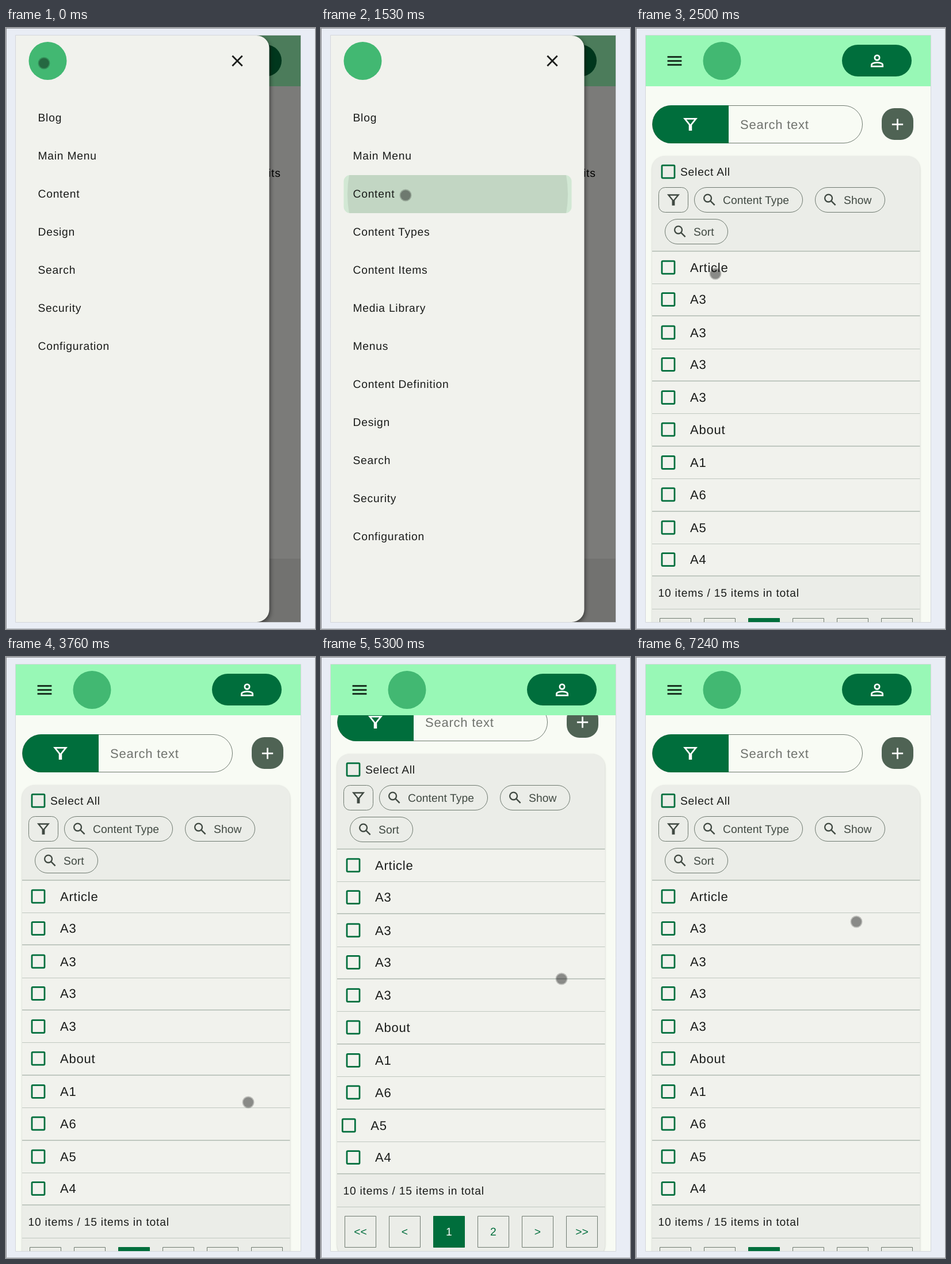
Write an HTML page with a canvas that moves like this. It is 537x1042 px and loops after 8000 ms.

```html
<!DOCTYPE html>
<html lang="en">
<head>
<meta charset="utf-8">
<title>Mobile admin menu</title>
<style>
html, body { margin: 0; width: 100%; height: 100%; overflow: hidden; background: #e9edf5; }
canvas { display: block; }
</style>
</head>
<body>
<canvas id="stage" width="537" height="1042"></canvas>
<script>
const ctx = document.getElementById('stage').getContext('2d');
const LOOP = 8000, TICK = 140;
const GREEN = '#006e3c', INK = '#1a1c1a', PANEL = '#f1f2ed', BAR = '#ebede8', OUTLINE = '#6f7a70', GREY = '#404942', LOGO = '#42b872';

// Line icons on a 24 unit grid
const ICONS = {
  menu: 'M3 7h18M3 12h18M3 17h18',
  person: 'M9 8a3 3 0 1 1 6 0a3 3 0 1 1-6 0M5 19v-2c0-2 4.5-3 7-3s7 1 7 3v2z',
  filter: 'M5 5h14l-6 7.5v6.5h-2v-6.5z',
  search: 'M4 9.5a5.5 5.5 0 1 1 11 0a5.5 5.5 0 1 1-11 0M13.6 13.6l6.2 6.2',
  plus: 'M5 12h14M12 5v14',
  close: 'M5.7 5.7l12.6 12.6M18.3 5.7l-12.6 12.6'
};

const MENU = ['Blog', 'Main Menu', 'Content', 'Design', 'Search', 'Security', 'Configuration'];
const SUBMENU = ['Content Types', 'Content Items', 'Media Library', 'Menus', 'Content Definition'];
const OPEN_MENU = [...MENU.slice(0, 3), ...SUBMENU, ...MENU.slice(3)];
const ITEMS = ['Article', 'A3', 'A3', 'A3', 'A3', 'About', 'A1', 'A6', 'A5', 'A4'];
const PAGES = ['<<', '<', '1', '2', '>', '>>'];

// Pointer stops: time, x, y
const STOPS = [[0, 66, 61], [1080, 147, 290], [1660, 147, 290], [2240, 138, 426], [3240, 138, 426],
  [3780, 421, 772], [4050, 445, 860], [4620, 421, 767], [5320, 418, 558], [5740, 404, 148],
  [6290, 404, 480], [7240, 383, 459]];

function pointerAt(t) {
  const next = STOPS.findIndex(stop => stop[0] > t);
  if (next < 0) return STOPS.at(-1).slice(1);
  const [t0, x0, y0] = STOPS[next - 1], [t1, x1, y1] = STOPS[next];
  const u = (t - t0) / (t1 - t0);
  return [x0 + (x1 - x0) * u, y0 + (y1 - y0) * u];
}

function ramp(t, from, to) {
  const u = Math.min(1, Math.max(0, (t - from) / (to - from)));
  return u * u * (3 - 2 * u);
}

const scrollAt = t => Math.round(61.6 * (ramp(t, 4340, 4620) - ramp(t, 5280, 5460)));
const swipeAt = t => -25 * (ramp(t, 5150, 5610) - ramp(t, 6580, 6850));

function rect(x, y, w, h, fill) {
  ctx.fillStyle = fill;
  ctx.fillRect(x, y, w, h);
}

function box(x, y, w, h, r, fill, stroke, width = 1) {
  ctx.beginPath();
  ctx.roundRect(x, y, w, h, r);
  if (fill) { ctx.fillStyle = fill; ctx.fill(); }
  if (stroke) { ctx.strokeStyle = stroke; ctx.lineWidth = width; ctx.stroke(); }
}

function disc(x, y, r, fill) {
  ctx.beginPath();
  ctx.arc(x, y, r, 0, 2 * Math.PI);
  ctx.fillStyle = fill;
  ctx.fill();
}

function icon(name, x, y, color, scale = 1.375) {
  ctx.save();
  ctx.translate(x, y);
  ctx.scale(scale, scale);
  ctx.translate(-12, -12);
  ctx.strokeStyle = color;
  ctx.lineWidth = 2;
  ctx.stroke(new Path2D(ICONS[name]));
  ctx.restore();
}

function text(str, x, cy, size = 19.25, fill = INK, spacing = .77, align = 'left') {
  ctx.font = `${size}px "Liberation Sans", Arial, sans-serif`;
  ctx.textRendering = 'geometricPrecision';
  ctx.letterSpacing = spacing + 'px';
  ctx.textAlign = align;
  ctx.fillStyle = fill;
  ctx.fillText(str, x, Math.round(cy + size * .36));
}

function shadow(color, blur, x, y) {
  ctx.shadowColor = color;
  ctx.shadowBlur = blur;
  ctx.shadowOffsetX = x;
  ctx.shadowOffsetY = y;
}

const checkbox = y => box(45, y - 11, 22, 22, 1.5, null, GREEN, 2.75);

function chip(label, x, y, w) {
  box(x, y, w, 43, 21.5, null, OUTLINE);
  icon('search', x + 26, y + 21.5, GREY, 1.17);
  text(label, x + 49.5, y + 21.5, 19.25, GREY, .08);
}

function drawDrawer(t) {
  rect(17, 13, 495, 1017, '#7b7b79');
  rect(17, 920, 495, 110, '#727270');
  rect(17, 13, 495, 88, '#4c7c5b');
  box(358, 29, 121, 55, 27.5, '#00371d');
  text('its', 456, 251, 19.25, '#000');

  ctx.save();
  shadow('rgba(0,0,0,.45)', 7, 2, 3);
  box(17, 13, 440.5, 1017, [0, 22, 22, 0], PANEL);
  ctx.restore();

  disc(72.5, 57, 33, LOGO);
  icon('close', 402, 57, INK);

  if (t >= 1230) {
    const row = t < 2370 ? 2 : 4;
    box(39.5, 123 + 66 * row, 396, 66, 11, '#d2e8d4');
    if (t < 1800) drawRipple(t);
  }
  const labels = t < 1500 ? MENU : OPEN_MENU;
  labels.forEach((label, i) => text(label, 55.5, 155.5 + 66 * i));
}

// Spreads from the pointer to the middle of the row, then fades
function drawRipple(t) {
  const grow = ramp(t, 1340, 1540), fade = ramp(t, 1540, 1820);
  ctx.save();
  ctx.clip();
  disc(147 + 90.5 * grow, 290 - 2 * grow, 191.5 * grow + 24 * fade, `rgba(0,0,0,${.08 * (1 - fade)})`);
  ctx.restore();
}

function drawList(t) {
  rect(17, 13, 495, 1017, '#f8fbf4');
  ctx.save();
  ctx.translate(0, -scrollAt(t));

  box(28.5, 134.5, 365, 65, 32.5, null, OUTLINE);
  box(28.5, 134, 132.5, 66, [33, 0, 0, 33], GREEN);
  icon('filter', 94.5, 167, '#fff');
  text('Search text', 181, 167, 22, '#70736e');
  box(427, 139, 55, 55, 22, '#4f6354');
  icon('plus', 454.5, 167, '#fff');

  ctx.save();
  shadow('rgba(0,0,0,.22)', 3, 0, 1);
  box(28, 222, 465.5, 873, 22, BAR);
  ctx.restore();
  checkbox(249);
  text('Select All', 77, 249);
  box(39.5, 276.5, 51, 43, 11, null, OUTLINE);
  icon('filter', 65, 298, GREY, 1.22);
  chip('Content Type', 101.5, 276.5, 188);
  chip('Show', 311.5, 276.5, 121);
  chip('Sort', 50.5, 331.5, 109);

  rect(28, 387, 465.5, 563, PANEL);
  for (let i = 0; i <= 11; i++) {
    const thick = i % 2 === 0;
    rect(28, Math.round(386.5 + 56.375 * i) - thick, 465.5, thick ? 2 : 1, '#c0c8c0');
  }
  ITEMS.forEach((label, i) => {
    // Rows come in pairs, as every second rule is thicker
    const y = 415 + 112.75 * (i >> 1) + 55.5 * (i % 2);
    ctx.save();
    if (label === 'A5') ctx.translate(swipeAt(t), 0);
    checkbox(y);
    text(label, 94, y, 22);
    ctx.restore();
  });

  text('10 items / 15 items in total', 38.5, 979);
  PAGES.forEach((label, i) => {
    const x = 41.5 + 77 * i, active = label === '1';
    box(x, 1023.5, 54, 54, 0, active ? GREEN : null, active ? GREEN : OUTLINE);
    text(label, x + 27, 1050, 19.25, active ? '#fff' : GREEN, .1, 'center');
  });
  ctx.restore();

  rect(17, 13, 495, 88, '#98f8b6');
  icon('menu', 67, 57, '#0d1f12');
  disc(149.5, 57, 33, LOGO);
  box(358, 29, 121, 55, 27.5, GREEN);
  icon('person', 419, 57, '#fff');
}

function draw(now) {
  const t = now % LOOP;
  const time = TICK * Math.floor((t + 40) / TICK);
  rect(0, 0, 537, 1042, '#e9edf5');
  rect(0, 0, 537, 1, '#8b8d91');
  rect(0, 0, 1, 1042, '#8b8d91');
  rect(0, 1041, 537, 1, '#b4b7bd');
  box(16.5, 12.5, 496, 1018, 0, null, '#d4d7dc');

  ctx.save();
  ctx.beginPath();
  ctx.rect(17, 13, 495, 1017);
  ctx.clip();
  if (t < 2500) drawDrawer(time);
  else drawList(time);
  const [x, y] = pointerAt(time);
  disc(x, y, 10.5, 'rgba(0,0,0,.22)');
  disc(x, y, 8.8, 'rgba(0,0,0,.27)');
  ctx.restore();
}

const start = performance.now();
function tick() {
  draw(performance.now() - start);
  requestAnimationFrame(tick);
}
tick();
</script>
</body>
</html>
```
